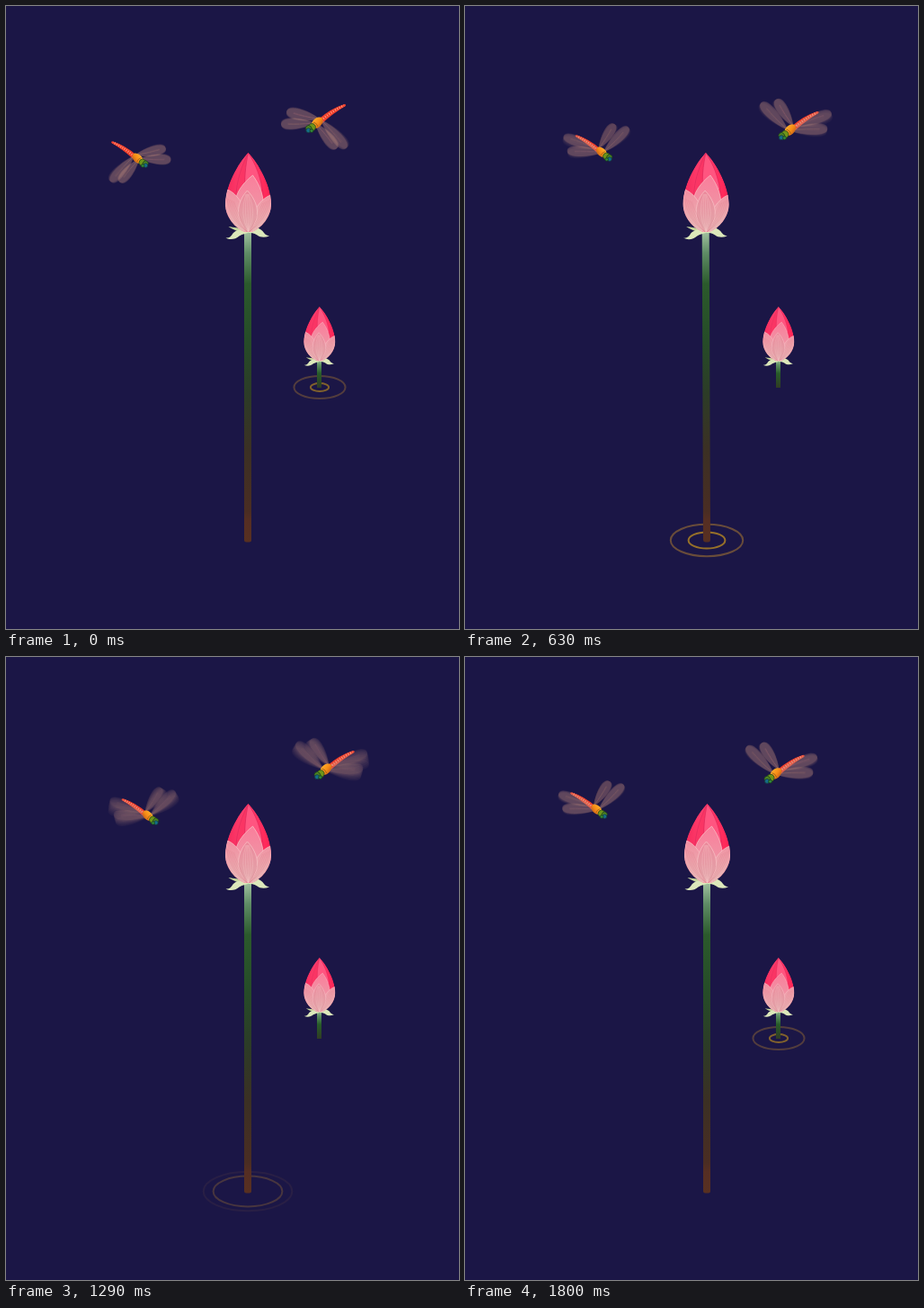
These frames come from a looping animation (504 px wide and 692 px high, 1.83 s). An HTML page with a canvas:

```html
<!DOCTYPE html>
<html lang="en">
<head>
<meta charset="utf-8">
<title>Lotus buds and dragonflies</title>
<style>
html, body { margin: 0; width: 100%; height: 100%; overflow: hidden; background: #1b1646; }
canvas { display: block; }
</style>
</head>
<body>
<canvas id="stage" width="504" height="692"></canvas>
<script>
const c = document.getElementById('stage').getContext('2d');
const LOOP = 1830, STEP = 30, TAU = Math.PI * 2, RAD = Math.PI / 180;
const mix = (a, b, u) => a + (b - a) * u;

function gradient(x0, y0, x1, y1, ...stops) {
  const g = c.createLinearGradient(x0, y0, x1, y1);
  stops.forEach(([at, color]) => g.addColorStop(at, color));
  return g;
}

function fill(d, color) {
  c.fillStyle = color;
  c.fill(new Path2D(d));
}

function line(d, color, width) {
  c.strokeStyle = color;
  c.lineWidth = width;
  c.stroke(new Path2D(d));
}

function oval(x, y, rx, ry, angle, color, edge) {
  c.beginPath();
  c.ellipse(x, y, rx, ry, angle, 0, TAU);
  c.fillStyle = color;
  c.fill();
  if (edge) {
    c.strokeStyle = edge;
    c.lineWidth = 0.8;
    c.stroke();
  }
}

function at(x, y, scale, draw) {
  c.save();
  c.translate(x, y);
  c.scale(scale, Math.abs(scale));
  draw();
  c.restore();
}

// Smooth closed path through [time, x, y] keys
function pathAt(keys, t) {
  const n = keys.length;
  const key = i => {
    const k = keys[(i + n) % n], turn = Math.floor(i / n);
    return [k[0] + turn * LOOP, k[1], k[2]];
  };
  let i = n - 1;
  while (keys[i][0] > t) i--;
  const [p, a, b, q] = [key(i - 1), key(i), key(i + 1), key(i + 2)];
  const span = b[0] - a[0], u = (t - a[0]) / span;
  return [1, 2].map(k => {
    const m0 = (b[k] - p[k]) / (b[0] - p[0]) * span;
    const m1 = (q[k] - a[k]) / (q[0] - a[0]) * span;
    return a[k] + m0 * u + (3 * (b[k] - a[k]) - 2 * m0 - m1) * u * u
      + (2 * (a[k] - b[k]) + m0 + m1) * u ** 3;
  });
}

// Dragonflies: paths follow the head
const rightPath = [[0, 338, 137], [360, 348, 144], [630, 353.5, 145], [810, 354.7, 142],
  [1080, 353, 136], [1500, 342, 130], [1800, 337.6, 136.7]];
const leftPath = [[0, 154, 176], [360, 156, 165], [630, 159.5, 169], [810, 161.5, 175],
  [1080, 165, 182], [1500, 164, 182], [1800, 154, 176]];

// Root x and y, then angle and length when lowered and raised
const wings = [[12, -11, 192, 238, 39, 36], [6, -7, 177, 226, 38, 43],
  [6, -7, 51, -3, 37, 44], [12, -11, 49, -21, 43, 45]];
const BEAT = 83.75, BLUR = 0.075, SAMPLES = 9;

function drawWing([x, y, a0, a1, l0, l1], lift, alpha) {
  const l = mix(l0, l1, lift);
  c.save();
  c.translate(x, y);
  c.rotate(mix(a0, a1, lift) * RAD);
  c.globalAlpha = alpha;
  fill(`M0,0C${l * .35},-6.5 ${l},-10 ${l},0C${l},10 ${l * .35},6.5 0,0Z`, '#c88a7a');
  line(`M2,0Q${l * .5},-1 ${l * .8},0`, '#d8988a', 0.6);
  c.restore();
}

function dragonfly(t) {
  fill('M10,-11.5Q23,-23 38.5,-28Q41,-27.5 39.6,-25.7Q27,-18.5 14,-7Z', '#ee3d2b');
  c.setLineDash([1, 1.7]);
  line('M13,-10Q24,-20 38,-26.5', '#ff9c80', 2.6);
  c.setLineDash([]);

  const phase = t / BEAT;
  for (const wing of wings) {
    for (let i = 0; i < SAMPLES; i++) {
      const p = phase + mix(-BLUR, BLUR, i / (SAMPLES - 1));
      drawWing(wing, (1 - Math.cos(p * TAU)) / 2, 0.5 / SAMPLES);
    }
  }

  const tilt = -42 * RAD;
  oval(8.2, -7.2, 7.6, 5, tilt, gradient(3, -9, 12, -3, [0, '#ffae2b'], [.6, '#f58a16'], [1, '#c8641a']));
  line('M4,-8Q8,-7 9,-3', '#8a5312', 0.7);
  oval(2, -2, 4.6, 4.2, tilt, '#6f9419', '#26451a');
  oval(-1.2, -1, 3.2, 3.5, tilt, '#4d8420', '#173a22');
  oval(-1.5, 1.2, 2.6, 2.5, 0, '#146d88', '#173a3a');
  oval(2, 1.6, 2, 1.8, 0, '#338b38', '#173a22');
}

// Lotus: origin at the tip of the bud
const outline = 'M0,0C7,6 25.5,33 25.5,57C25.5,72 14,84 4,88L-4,88C-14,84 -25.5,72 -25.5,57C-25.5,33 -7,6 0,0Z';

function sepals() {
  const green = '#dce8ba';
  fill('M-2,86C-10,83 -16,83 -22,82C-16,86 -8,89 -2,89Z', '#c5d69c');
  fill('M0,83C-6,85 -13,85 -17,89.5C-19,93 -21,95 -25,94.5C-20,97.5 -14,96 -10,92.5C-6,90 -3,90 0,89Z', green);
  fill('M0,83C7,82 13,83.5 16,87C18,90 20,92 23.5,92.5C18,94.5 13,94 10,91.5C6,89 3,89 0,89Z', green);
}

function bud() {
  sepals();
  c.save();
  c.clip(new Path2D(outline));
  fill(outline, gradient(-25, 0, 25, 0, [0, '#f52a5c'], [.45, '#ff3f6e'], [1, '#ff2455']));
  fill('M0,0C-7,14 -12,30 -12,55L-2,50C-5,30 -3,14 0,0Z', '#fa3564');
  fill('M0,0C7,12 13,24 15,40L-2,55C-5,30 -3,14 0,0Z', '#ff5580');
  line('M0,0C-7,14 -13,30 -14,52M0,0C-3,14 -5,30 -3,45M0,0C8,12 14,26 17,48', '#e02a5c', 0.7);
  const edge = '#f9c3c8', pink = (top, base) => gradient(0, 28, 0, 88, [0, top], [1, base]);
  const petal = (d, color) => { fill(d, color); line(d, edge, 0.7); };
  petal('M5,25C-5,33 -14,43 -15,58L0,88L17,60C17,43 10,32 5,25Z', pink('#f9809c', '#e8a3ab'));
  petal('M-23,41C-8,47 1,70 -1,88C-15,87 -26,75 -25.5,57C-25.5,51 -24,45 -23,41Z', pink('#f4829a', '#e8b9b8'));
  petal('M25,47C11,52 1,72 1,88C14,87 26,75 25.5,57Z', pink('#f4829a', '#e8b9b8'));
  petal('M-1,42C-9,50 -14,64 -9,76Q-5,84 0,88Q7,82 9,74C13,62 6,49 -1,42Z', pink('#ee8097', '#e2a9ac'));
  for (let i = -2; i <= 2; i++) {
    line(`M${i * .8 - 1},46Q${i * 5},68 0,87`, 'rgba(250,205,205,.5)', 0.6);
    line(`M${i * 2 - 20},${52 + i}Q${i * 3 - 14},76 -1,88M${20 - i * 2},${54 + i}Q${14 - i * 3},76 1,88`,
      'rgba(215,110,130,.4)', 0.6);
  }
  c.restore();
}

// Gold rings that widen and fade; their cycle is one step shorter than the loop
const RING_LIFE = 660, RING_CYCLE = LOOP - STEP;

function ripples(x, y, reach, starts, strength, t) {
  starts.forEach((start, i) => {
    const u = ((t - start + RING_CYCLE) % RING_CYCLE) / RING_LIFE;
    if (u >= 1) return;
    const r = reach * (1 - (1 - u) ** 2);
    c.beginPath();
    c.ellipse(x, y, r, r * 0.44, 0, 0, TAU);
    c.strokeStyle = `rgba(${mix(235, 180, u)},${mix(180, 115, u)},${mix(10, 70, u)},${strength[i] * (1 - u)})`;
    c.lineWidth = 2;
    c.stroke();
  });
}

function sway(t) {
  const keys = [[0, 0], [360, 1.4], [630, -1.6], [810, 0], [LOOP, 0]];
  const i = keys.findIndex(k => k[0] > t) - 1;
  const [a, b] = [keys[i], keys[i + 1]];
  return mix(a[1], b[1], (1 - Math.cos(Math.PI * (t - a[0]) / (b[0] - a[0]))) / 2);
}

function draw(t) {
  c.fillStyle = '#1b1646';
  c.fillRect(0, 0, 504, 692);

  ripples(269, 593.5, 50, [262, 478, 711, 948], [1, .82, .7, .52], t);
  ripples(349, 423.5, 36, [1440, 1700], [.7, .6], t);

  // Tall bud leans about the foot of its stem
  c.save();
  c.translate(269, 594);
  c.rotate(sway(t) / 430);
  c.translate(-269, -594);
  c.fillStyle = gradient(0, 250, 0, 596, [0, '#a3c3a2'], [.07, '#5f8c66'], [.17, '#2b5a2c'], [.35, '#264c28'],
    [.52, '#2c3c27'], [.7, '#3b3024'], [.9, '#4a2d23'], [.93, '#552e23'], [1, '#583021']);
  c.beginPath();
  c.roundRect(265, 248, 8, 347.5, 2.5);
  c.fill();
  at(269.5, 163, 1, bud);
  c.restore();

  c.fillStyle = gradient(0, 392, 0, 424, [0, '#a9caa6'], [.2, '#5f9164'], [.5, '#275c29'], [1, '#303b24']);
  c.fillRect(346, 392, 5, 32);
  at(348.8, 334, 0.685, bud);

  at(...pathAt(leftPath, t), -0.92, () => dragonfly(t));
  at(...pathAt(rightPath, t), 1, () => dragonfly(t));
}

const begin = performance.now();
function tick() {
  const t = (performance.now() - begin) % LOOP;
  draw(Math.floor(t / STEP) * STEP);
  requestAnimationFrame(tick);
}
tick();
</script>
</body>
</html>
```
